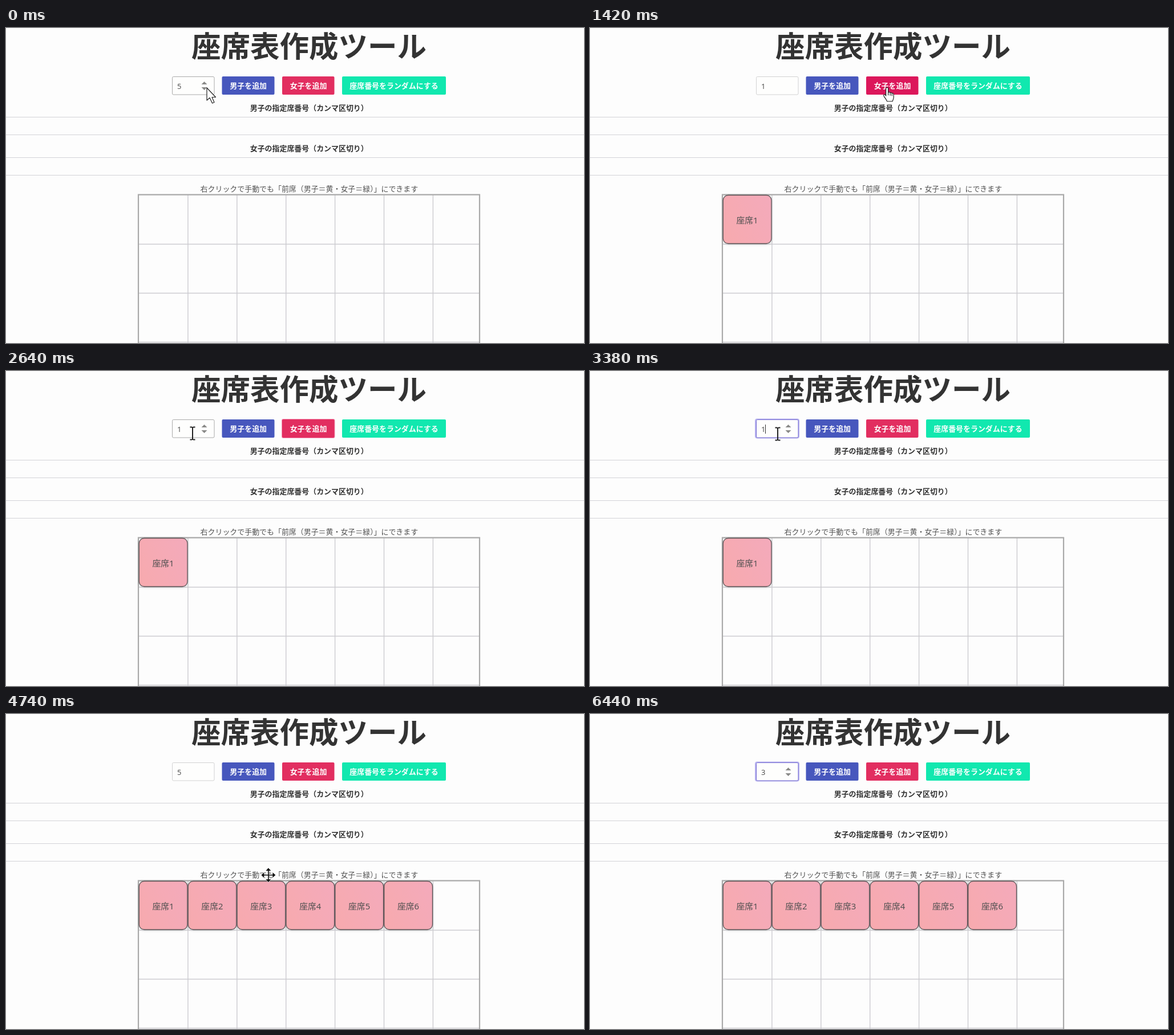
Write an HTML page that moves like this. It is 1013 px wide and 553 px high and loops after 6.48 s.

```html
<!DOCTYPE html>
<html lang="ja">
<head>
<meta charset="utf-8">
<title>座席表作成ツール</title>
<style>
html, body { margin: 0; height: 100%; overflow: hidden; background: #fdfdfd; }
svg { display: block; width: 100vw; height: 100vh; font: 12.94px "Noto Sans", "Noto Sans CJK JP", "Noto Sans CJK", sans-serif; fill: #505050; }
.mid { text-anchor: middle; }
.bold { font-weight: 700; fill: #333; }
.btn { font-weight: 700; fill: #fff; }
.seat rect { fill: url(#pink); stroke: #5c5356; stroke-width: 1.3; filter: drop-shadow(0 1px 2px #0002); }
.seat text { font-size: 14.8px; }
#cursor > * { fill: #fff; stroke: #222; stroke-width: 1.2; stroke-linejoin: round; }
</style>
</head>
<body>
<svg viewBox="0 0 1013 553">
  <defs>
    <linearGradient id="pink" x1="0" y1=".75" x2="1" y2=".3">
      <stop offset="0" stop-color="#f7aaaf"/>
      <stop offset="1" stop-color="#f4aaba"/>
    </linearGradient>
  </defs>
  <text class="mid bold" x="531" y="51" font-size="51.5">座席表作成ツール</text>

  <rect id="glow" x="290" y="84.5" width="76" height="33" rx="3" fill="none" stroke="#b9b4f0" stroke-width="2"/>
  <rect id="field" x="291.5" y="85.5" width="73.5" height="31.5" rx="2" fill="#fefefd" stroke="#d2d2d2"/>
  <text id="value" x="300" y="106.5"></text>
  <path id="caret" d="M307.5 94V110" stroke="#333"/>
  <path id="spin" d="M342.5 99L347.5 94L352.5 99ZM342.5 104L347.5 109L352.5 104Z" fill="#8a8a88"/>

  <rect x="378.5" y="85" width="92" height="32" rx="2" fill="#4757bd"/>
  <rect id="ring" x="483" y="84" width="93.500" height="34" rx="3" fill="#f38fb0"/>
  <rect id="girl" x="484" y="85" width="91.500" height="32" rx="2"/>
  <rect x="589" y="85" width="182" height="32" rx="2" fill="#11e8af"/>
  <g class="mid btn">
    <text x="424.7" y="106.3">男子を追加</text>
    <text x="530" y="106.3">女子を追加</text>
    <text x="680" y="106.3">座席番号をランダムにする</text>
  </g>

  <text class="bold" x="427.7" y="145">男子の指定席番号（カンマ区切り）</text>
  <text class="bold" x="427.7" y="216">女子の指定席番号（カンマ区切り）</text>
  <path d="M0 156.5H1013M0 187.5H1013M0 227.5H1013M0 258.5H1013" stroke="#d3d3d8"/>
  <text x="340.6" y="287">右クリックで手動でも「前席（男子＝黄・女子＝緑）</text>
  <text x="644.5" y="287">」にできます</text>

  <path id="grid" stroke="#cccbd0" stroke-width="1.4"/>
  <path d="M232 560V292.7H830V560" fill="none" stroke="#a9a9a9" stroke-width="2.2"/>
  <g id="seats"></g>

  <g id="cursor">
    <path id="arrow" d="M0 0V22L5 17.5L9.5 27L13 25.5L9 16.5H15.5Z"/>
    <path id="hand" d="M-2 1.5Q-2 -1 0 -1T2 1.5V8Q4 6.5 5.5 8.5Q7.5 7.5 8.5 9.5Q11.5 8.5 11.5 12V17Q11 20 9.5 23.5H0Q-2 19 -5 15.5Q-7 12 -5 11.5T-2 14ZM2 8V13M5.5 8.5V13.5M8.5 9.5V14"/>
    <path id="beam" d="M-4.5 -10.5H-1.5L0 -9.5L1.5 -10.5H4.5M0 -9.5V10.5M-4.5 11.5H-1.5L0 10.5L1.5 11.5H4.5" style="fill:none;stroke-width:2"/>
    <path id="move" d="M0 -12.5L4.5 -7.5H.8V-.8H7.5V-4.5L12.5 0L7.5 4.5V.8H.8V7.5H4.5L0 12.5L-4.5 7.5H-.8V.8H-7.5V4.5L-12.5 0L-7.5 -4.5V-.8H-.8V-7.5H-4.5Z" style="fill:#111;stroke:#fff;paint-order:stroke"/>
  </g>
</svg>
<script>
const $ = id => document.getElementById(id);
const LOOP = 6480;
const PITCH = 85.9;

// Pointer stops: time, x, y
const path = [
  [20, 352, 105], [300, 523, 108], [560, 523, 108], [760, 521, 104],
  [1240, 521, 104], [1280, 521, 105], [1420, 521, 105], [1980, 324, 238],
  [2080, 324, 238], [2640, 327, 109], [2920, 327, 109], [3100, 329, 110],
  [3900, 329, 110], [4140, 522, 106], [4240, 522, 106], [4500, 490, 378],
  [4600, 490, 378], [4740, 460, 283], [5200, 391, 148], [5300, 391, 148],
  [5580, 369, 125], [5900, 329, 109]
];
// States: start time, state
const kinds = [[0, 'arrow'], [220, 'hand'], [1480, 'arrow'], [2600, 'beam'], [3660, ''], [3900, 'beam'],
  [3960, 'arrow'], [4060, 'hand'], [4280, 'arrow'], [4400, 'move'], [4780, 'arrow'], [5780, 'beam'], [6160, '']];
const values = [[0, '5'], [560, '1'], [3640, ''], [3700, '5'], [6120, ''], [6200, '3']];
const counts = [[0, 0], [600, 1], [4220, 6]];

const at = (list, t) => list.findLast(s => s[0] <= t)[1];
const within = (t, ...spans) => spans.some(([a, b]) => t >= a && t < b);
const show = (id, on) => { $(id).style.display = on ? '' : 'none'; };

function pointer(t) {
  const i = path.findIndex(p => p[0] > t);
  if (i === 0) return path[0].slice(1);
  if (i < 0) return path.at(-1).slice(1);
  const [a, b] = [path[i - 1], path[i]];
  const u = (t - a[0]) / (b[0] - a[0]);
  return [1, 2].map(k => a[k] + (b[k] - a[k]) * u);
}

let lines = '';
for (let i = 1; i < 7; i++) lines += `M${233 + i * PITCH} 293V553`;
for (let i = 1; i < 4; i++) lines += `M232 ${293.5 + i * 86}H830`;
$('grid').setAttribute('d', lines);

$('seats').innerHTML = Array.from({ length: 6 }, (_, i) =>
  `<g class="seat" transform="translate(${233 + i * PITCH} 293.5)">
    <rect x=".3" width="84.7" height="85" rx="9"/>
    <text class="mid" x="42.5" y="49.5">座席${i + 1}</text>
  </g>`).join('');
const seats = [...$('seats').children];

function draw(now) {
  const t = now % LOOP;
  const focus = within(t, [2680, 4180], [5960, LOOP]);
  const hover = within(t, [0, 80], [2600, 2680], [5800, 5960]);

  $('value').textContent = at(values, t);
  $('field').setAttribute('stroke', focus ? '#7168cf' : hover ? '#aaa' : '#d2d2d2');
  show('glow', focus);
  show('spin', focus || hover);
  show('caret', within(t, [2920, 3520]));
  show('ring', within(t, [1560, 2680], [4800, 5960]));
  $('girl').setAttribute('fill', within(t, [300, 1480], [4080, 4280]) ? '#dc175b' : '#e22e60');

  const count = at(counts, t);
  seats.forEach((seat, i) => { seat.style.display = i < count ? '' : 'none'; });

  const kind = at(kinds, t);
  for (const id of ['arrow', 'hand', 'beam', 'move']) show(id, id === kind);
  $('cursor').setAttribute('transform', `translate(${pointer(t)})`);
  requestAnimationFrame(draw);
}
requestAnimationFrame(draw);
</script>
</body>
</html>
```
